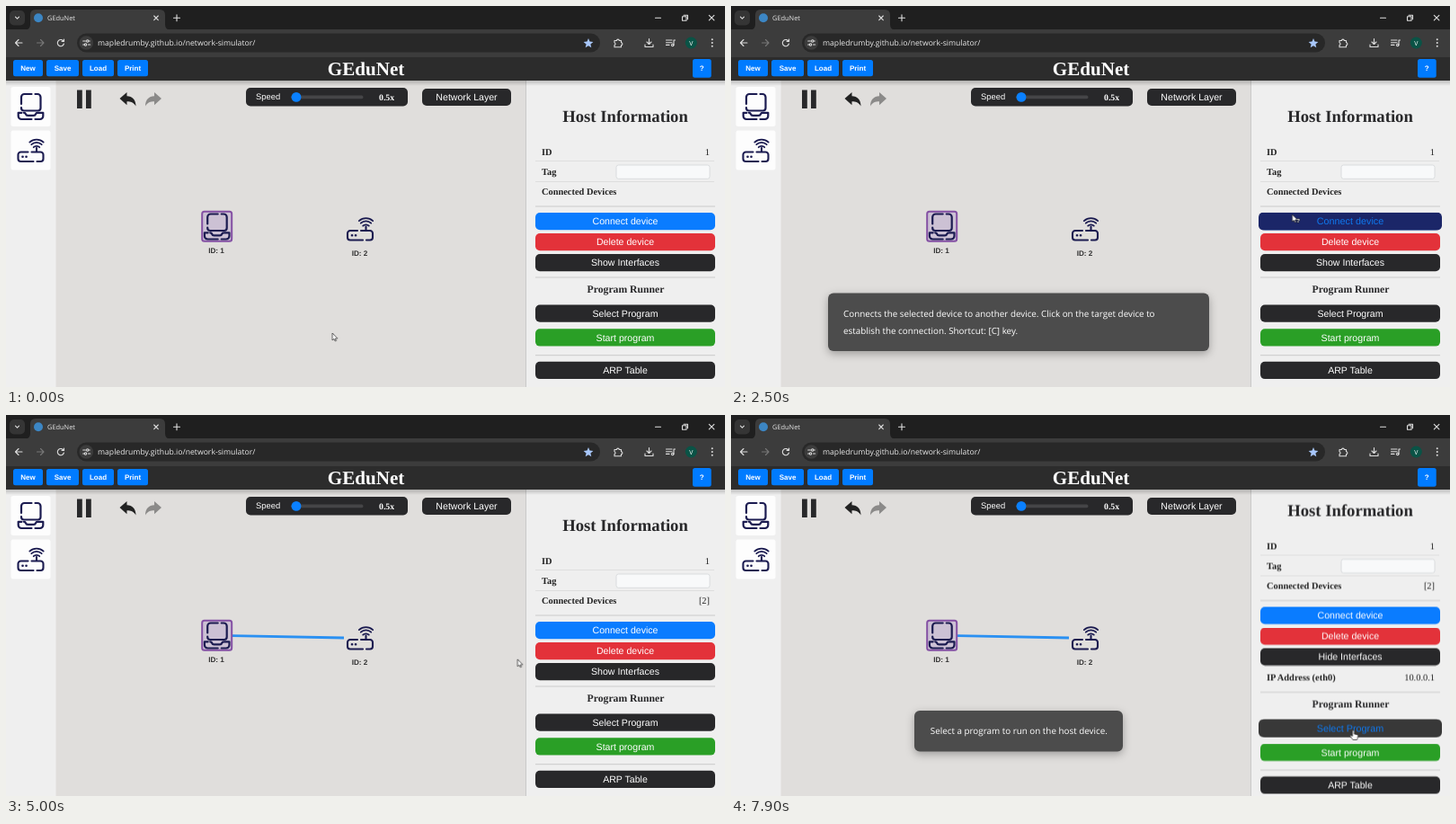
Recreate the animation shown at these times as an HTML page. Size 800x424 px, loop 8000 ms.

```html
<!DOCTYPE html>
<html lang="en">
<head>
<meta charset="utf-8">
<title>GEduNet</title>
<style>
html, body { margin: 0; width: 100%; height: 100%; overflow: hidden; background: #e0dedc; }
svg { display: block; width: 800px; height: 424px; }
text { text-rendering: geometricPrecision; white-space: pre; }
.ui { font-family: "Open Sans", "Noto Sans", sans-serif; }
.sans { font-family: "Liberation Sans", Arial, sans-serif; }
.serif { font-family: "Liberation Serif", "Times New Roman", serif; }
.bold { font-weight: bold; }
.mid { text-anchor: middle; }
.end { text-anchor: end; }
.line { fill: none; stroke-linecap: round; stroke-linejoin: round; }
.btn text { font: 10.6px "Liberation Sans", Arial, sans-serif; text-anchor: middle; fill: #fff; }
.btn.hot text { fill: #0f78ee; }
.dark { fill: #28282a; }
.menu text { font: bold 8px "Liberation Sans", Arial, sans-serif; text-anchor: middle; fill: #fff; }
.menu rect { fill: #007bff; }
.row { font: 10.4px "Liberation Serif", "Times New Roman", serif; fill: #222; }
.tip rect { fill: #4c4c4c; filter: drop-shadow(0 3px 5px rgba(0,0,0,.3)); }
.tip text { font: 9.86px "Open Sans", "Noto Sans", sans-serif; fill: #fff; }

.move, .scroll, .fade, .cut { animation: 8s linear infinite; }
.cut { animation-timing-function: step-end; }
.fade, .cut { opacity: 0; }

.move { animation-name: move; }
@keyframes move {
  0% { transform: translate(363px, 364px); }
  13.75% { transform: translate(507.5px, 359px); }
  20% { transform: translate(577px, 264px); }
  25% { transform: translate(622px, 236px); }
  31.25%, 36.25% { transform: translate(624.5px, 232px); }
  46.25% { transform: translate(396px, 253px); }
  52.5%, 56.25% { transform: translate(397px, 253px); }
  66.25% { transform: translate(672px, 283px); }
  72.5% { transform: translate(673px, 287px); }
  75%, 80% { transform: translate(673.5px, 304px); }
  88.75%, 91.25% { transform: translate(693px, 324px); }
  95%, 100% { transform: translate(692.5px, 351px); }
}
.scroll { animation-name: scroll; }
@keyframes scroll {
  0%, 81.25% { transform: none; }
  85%, 100% { transform: translateY(-16.5px); }
}
.lower { animation: lower 8s step-end infinite; }
@keyframes lower { 0% { transform: none; } 71.25%, 100% { transform: translateY(23px); } }

.on-connect { animation-name: onConnect; }
@keyframes onConnect { 0%, 22.5% { opacity: 0; } 26.25%, 36.25% { opacity: 1; } 40%, 100% { opacity: 0; } }
.on-show { animation-name: onShow; }
@keyframes onShow { 0%, 62.5% { opacity: 0; } 65%, 72.5% { opacity: 1; } 76.25%, 100% { opacity: 0; } }
.on-runner { animation-name: onRunner; }
@keyframes onRunner { 0%, 85% { opacity: 0; } 87.5%, 91.25% { opacity: 1; } 93.75%, 100% { opacity: 0; } }
.on-select { animation-name: onSelect; }
@keyframes onSelect { 0%, 92.5% { opacity: 0; } 96.25%, 100% { opacity: 1; } }

.linked { animation-name: linked; }
@keyframes linked { 0% { opacity: 0; } 48.75%, 100% { opacity: 1; } }
.opened { animation-name: opened; }
@keyframes opened { 0% { opacity: 0; } 71.25%, 100% { opacity: 1; } }
.closed { animation-name: closed; }
@keyframes closed { 0% { opacity: 1; } 71.25%, 100% { opacity: 0; } }

.arrow { animation-name: arrow; }
@keyframes arrow { 0% { opacity: 1; } 46.25% { opacity: 0; } 51% { opacity: 0; } 56.25% { opacity: 1; } 63.75% { opacity: 0; } 73.75% { opacity: 1; } 92.5%, 100% { opacity: 0; } }
.help { animation-name: help; }
@keyframes help { 0% { opacity: 0; } 22.5% { opacity: 1; } 38.75% { opacity: 0; } 86.25% { opacity: 1; } 92.5%, 100% { opacity: 0; } }
.hand { animation-name: hand; }
@keyframes hand { 0% { opacity: 0; } 46.25% { opacity: 1; } 56.25% { opacity: 0; } 63.75% { opacity: 1; } 73.75% { opacity: 0; } 92.5%, 100% { opacity: 1; } }
</style>
</head>
<body>
<svg viewBox="0 0 800 424" xmlns="http://www.w3.org/2000/svg">
  <defs>
    <linearGradient id="shade" x2="0" y2="1">
      <stop stop-opacity=".2"/><stop offset="1" stop-opacity="0"/>
    </linearGradient>
    <g id="pc" class="line" stroke="#1b1b50" stroke-width="2.2">
      <path d="M-10.5 -3V-10.5a3.5 3.5 0 0 1 3.5-3.5H1M5 -14H7.5a3.5 3.5 0 0 1 3.5 3.5V1.5a3 3 0 0 1-3 3H-7.5a3 3 0 0 1-3-3V1"/>
      <path d="M-10 6.8h-3.8v3.7a3.5 3.5 0 0 0 3.5 3.5H1M5 14h5.3a3.5 3.5 0 0 0 3.5-3.5V6.8H7.5q-1.5 0-2 1.5t-2.3 1.6h-6.4q-1.8 0-2.3-1.6t-2-1.5"/>
    </g>
    <g id="router" class="line" stroke="#1b1b50" stroke-width="2.1">
      <path d="M-3 1.5H-11a3 3 0 0 0-3 3V9a3 3 0 0 0 3 3H3M7 12h4a3 3 0 0 0 3-3V4.5a3 3 0 0 0-3-3H1M6.5 1V-3"/>
      <path d="M3.2 -3.8a4.6 4.6 0 0 1 6.6 0M.8 -6.8a8.2 8.2 0 0 1 11.4 0M-1.2 -9.4a11.3 11.3 0 0 1 15.4 0" stroke-width="1.8"/>
      <path d="M-9 6.8h.1M-5 6.8h.1" stroke-width="2.6"/>
    </g>
    <path id="turn" d="M0 7L8 0V4.2C14 4.4 18 8 18 15.500C15.500 11.500 12.500 10.300 8 10.300V14.300Z"/>
    <path id="pointer" d="M0 0V8L1.900 6.400L3.100 9L4.300 8.500L3.200 6H5.700Z" fill="#fff" stroke="#222" stroke-width=".7" stroke-linejoin="round"/>
  </defs>

  <!-- Workspace -->
  <rect width="800" height="424" fill="#e0dedc"/>
  <rect y="83" width="55.500" height="341" fill="#efefef"/>
  <g fill="#fdfdfd">
    <rect x="5.500" y="90" width="44" height="44" rx="2.500"/>
    <rect x="5.500" y="138.500" width="44" height="44" rx="2.500"/>
  </g>
  <use href="#pc" x="27.500" y="112"/>
  <use href="#router" x="27.500" y="161"/>

  <path d="M79 93.500h5.800v20.500H79zM89 93.500h5.800v20.500H89z" fill="#28282a"/>
  <use href="#turn" x="126.500" y="96" fill="#222"/>
  <use href="#turn" transform="translate(173 96) scale(-1 1)" fill="#8b8a89"/>
  <rect class="dark" x="267" y="91" width="180" height="20.500" rx="5"/>
  <text class="sans" x="278" y="104" font-size="9.400" fill="#fff">Speed</text>
  <rect x="317" y="99.500" width="80.500" height="3.800" rx="1.900" fill="#454547"/>
  <circle cx="323" cy="101.400" r="5.400" fill="#0a80ff"/>
  <text class="serif bold" x="415" y="104.600" font-size="9.800" fill="#fff">0.5x</text>
  <g class="btn" transform="translate(463 92)">
    <rect class="dark" width="99" height="19" rx="5"/><text x="49.500" y="13.200">Network Layer</text>
  </g>

  <path class="cut linked" d="M252 245.600L376 248" stroke="#2a90f2" stroke-width="2.800"/>
  <rect x="218.200" y="228.800" width="33" height="33" rx="2.500" fill="#ccc1d4" stroke="#8450a4" stroke-width="2"/>
  <use href="#pc" x="234.700" y="245.500"/>
  <use href="#router" x="394" y="248.500"/>
  <g class="sans bold mid" font-size="8.200" fill="#333">
    <text x="234" y="274.600">ID: 1</text>
    <text x="393.500" y="277.600">ID: 2</text>
  </g>

  <!-- Side panel -->
  <rect x="578" y="83" width="222" height="341" fill="#efefef"/>
  <path d="M578.500 83V424" stroke="#c9c9c9"/>
  <g class="scroll">
    <text class="serif bold mid" x="689" y="129.300" font-size="18.700" fill="#28282a">Host Information</text>
    <g class="row">
      <text class="bold" x="596" y="165.800">ID</text><text class="end" x="783" y="165.800">1</text>
      <text class="bold" x="596" y="187.800">Tag</text>
      <text class="bold" x="596" y="209.800">Connected Devices</text>
      <text class="end cut linked" x="783" y="209.800">[2]</text>
    </g>
    <path d="M589 172.500H788M589 195.500H788" stroke="#dedede"/>
    <rect x="679" y="177" width="104" height="15.300" rx="2.500" fill="#f8f9fa" stroke="#d4d6d8" stroke-width=".8"/>
    <path d="M589 223H789" stroke="#cbcbcb"/>
    <g class="btn" transform="translate(589 230)">
      <rect width="200" height="19.300" rx="5" fill="#0a7cff"/><text x="100" y="13.300">Connect device</text>
    </g>
    <g class="btn hot fade on-connect" transform="translate(587 229.700) scale(1.02)">
      <rect width="200" height="19.300" rx="5" fill="#1b2668"/><text x="100" y="13.300">Connect device</text>
    </g>
    <g class="btn" transform="translate(589 253)">
      <rect width="200" height="19.300" rx="5" fill="#e3323a"/><text x="100" y="13.300">Delete device</text>
    </g>
    <g class="btn" transform="translate(589 276)">
      <rect class="dark" width="200" height="19.300" rx="5"/>
      <text class="cut closed" x="100" y="13.300">Show Interfaces</text>
      <text class="cut opened" x="100" y="13.300">Hide Interfaces</text>
    </g>
    <g class="btn hot fade on-show" transform="translate(587 275.700) scale(1.02)">
      <rect width="200" height="19.300" rx="5" fill="#383838"/>
      <text class="cut closed" x="100" y="13.300">Show Interfaces</text>
      <text class="cut opened" x="100" y="13.300">Hide Interfaces</text>
    </g>
    <g class="row cut opened">
      <text class="bold" x="596" y="312.300">IP Address (eth0)</text><text class="end" x="783" y="312.300">10.0.0.1</text>
    </g>
    <g class="lower">
      <path d="M589 302H789M589 388.700H789" stroke="#cbcbcb"/>
      <g class="serif bold mid" font-size="11.700">
        <text x="689.500" y="319.300" fill="#28282a">Program Runner</text>
        <text class="fade on-runner" x="689.500" y="319.300" fill="#1f3150">Program Runner</text>
      </g>
      <g class="btn" transform="translate(589 332.500)">
        <rect class="dark" width="200" height="19.300" rx="5"/><text x="100" y="13.300">Select Program</text>
      </g>
      <g class="btn hot fade on-select" transform="translate(587 332.200) scale(1.02)">
        <rect width="200" height="19.300" rx="5" fill="#383838"/><text x="100" y="13.300">Select Program</text>
      </g>
      <g class="btn" transform="translate(589 359.300)">
        <rect width="200" height="19.300" rx="5" fill="#2a9f26"/><text x="100" y="13.300">Start program</text>
      </g>
      <g class="btn" transform="translate(589 395.800)">
        <rect class="dark" width="200" height="19.300" rx="5"/><text x="100" y="13.300">ARP Table</text>
      </g>
    </g>
  </g>

  <!-- App header -->
  <rect y="83" width="800" height="6" fill="url(#shade)"/>
  <rect y="57" width="800" height="26" fill="#2c2c2c"/>
  <g class="menu">
    <rect x="8" y="60" width="33" height="18.300" rx="2.500"/><text x="24.500" y="72">New</text>
    <rect x="45" y="60" width="36" height="18.300" rx="2.500"/><text x="63" y="72">Save</text>
    <rect x="85" y="60" width="35" height="18.300" rx="2.500"/><text x="102.500" y="72">Load</text>
    <rect x="124" y="60" width="34" height="18.300" rx="2.500"/><text x="141" y="72">Print</text>
    <rect x="764" y="59" width="20.700" height="20.700" rx="2.500"/><text x="774.300" y="72.300">?</text>
  </g>
  <text class="serif bold mid" x="400.500" y="76.800" font-size="21.100" fill="#fff">GEduNet</text>

  <!-- Browser frame -->
  <rect width="800" height="27" fill="#1f1f1f"/>
  <rect y="26" width="800" height="31" fill="#3c3c3c"/>
  <path d="M21 26.500q6 0 6-6V10q0-6 6-6H171q6 0 6 6V20.500q0 6 6 6Z" fill="#3c3c3c"/>
  <rect x="4" y="5" width="17" height="16.500" rx="5" fill="#353535"/>
  <circle cx="36" cy="13.300" r="5" fill="#3c86c4"/>
  <text class="ui" x="46" y="16" font-size="7.400" fill="#e6e6e6">GEduNet</text>
  <rect x="79" y="30.500" width="582" height="21" rx="10.500" fill="#282828"/>
  <circle cx="89.300" cy="41" r="7.800" fill="#3c3c3c"/>
  <g class="line" stroke="#dedede" stroke-width="1.100">
    <path d="M10.500 12.200l2 2 2-2M164.700 11l4.600 4.600m0-4.600l-4.600 4.600M186.500 13.300h7M190 9.800v7"/>
    <path d="M722.500 13.300h6M752.500 11.700h4.500v4.500h-4.500zM754 10.200h4.500v4.500M782.300 10.300l5.600 5.600m0-5.600l-5.600 5.600"/>
    <path d="M18 41h-7.500m3.500-3.500l-3.500 3.500 3.500 3.500"/>
    <path d="M34.500 41H42m-3.500-3.500l3.500 3.500-3.500 3.500" stroke="#777"/>
    <path d="M64 39.200a3.600 3.600 0 1 0 .4 2.800M64.500 37v2.400h-2.400"/>
    <path d="M85.700 39h2.800M91.500 43h2.200M85.700 43h1.500M92.500 39h.8"/>
    <circle cx="90.700" cy="39" r="1.200"/><circle cx="88.500" cy="43" r="1.200"/>
    <path d="M677 38.500h2.500a1.400 1.400 0 0 1 2.800 0h2.200v2.300a1.400 1.400 0 0 1 0 2.800v2.200H677v-2.300a1.400 1.400 0 0 0 0-2.700z"/>
    <path d="M715.500 36.500v6m-2.500-2.500l2.500 2.500 2.500-2.500M711 43v2.500h9V43"/>
    <path d="M734.500 38h6.500M734.500 40.700h6.500M734.500 43.400h3.500M743 43.500v-5.500h1.500"/>
    <circle cx="741.700" cy="43.500" r="1.200"/>
    <path d="M785.700 37.200h.1M785.700 41h.1M785.700 44.800h.1" stroke-width="1.900"/>
  </g>
  <text class="ui" x="102" y="44.300" font-size="8.670" fill="#e8e8e8">mapledrumby.github.io/network-simulator/</text>
  <path d="M648 36l1.500 3.600 3.900.3-3 2.500.9 3.800-3.300-2-3.300 2 .9-3.800-3-2.500 3.900-.3Z" fill="#a8c7fa"/>
  <circle cx="762.300" cy="41" r="6.500" fill="#0a5346"/>
  <text class="ui mid" x="762.300" y="43.700" font-size="7" fill="#fff">V</text>

  <!-- Tooltips -->
  <g class="tip fade on-connect">
    <rect x="108" y="319.500" width="424" height="64.500" rx="6"/>
    <text x="125" y="346">Connects the selected device to another device. Click on the target device to</text>
    <text x="125" y="365">establish the connection. Shortcut: [C] key.</text>
  </g>
  <g class="tip fade on-runner">
    <rect x="162.300" y="329" width="315.500" height="45.500" rx="6"/>
    <text class="mid" x="320.300" y="355.400">Here you can execute different programs on the host devices.</text>
  </g>
  <g class="tip fade on-select">
    <rect x="204" y="329" width="232" height="45.500" rx="6"/>
    <text class="mid" x="320.300" y="355.400">Select a program to run on the host device.</text>
  </g>

  <!-- Mouse -->
  <g class="move">
    <use class="cut arrow" href="#pointer"/>
    <text class="cut help sans bold" x="4.800" y="9" font-size="6" fill="#fff" stroke="#222" stroke-width=".9" paint-order="stroke">?</text>
    <path class="cut hand" d="M-1 .8a1 1 0 0 1 2 0V4l3.300.7q1 .3.900 1.400L4.700 8.500 4 10.500H-.5L-3.300 6.600q-.4-1 .5-1.300L-1 6.500Z" fill="#fff" stroke="#222" stroke-width=".7" stroke-linejoin="round"/>
  </g>
</svg>
</body>
</html>
```
